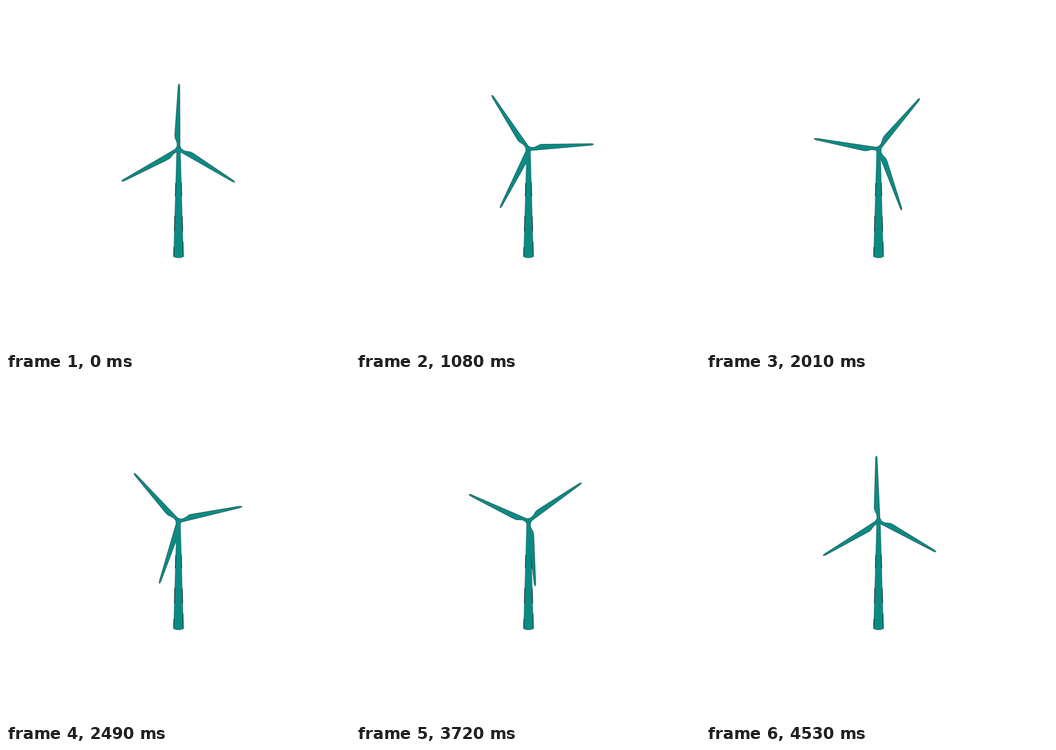
An HTML page for the animation above (4.56 s loop, 748x748 px).

```html
<!DOCTYPE html>
<html lang="en">
<head>
<meta charset="utf-8">
<title>Wind turbine</title>
<style>
  html, body { margin: 0; width: 100%; height: 100%; overflow: hidden; background: #fff; }
  svg { display: block; width: 100%; height: 100%; }
</style>
</head>
<body>
<svg viewBox="0 0 748 748">
  <defs>
    <path id="blade" d="M-3 -5 L-3 -12 C-3.2 -18 -7.8 -22 -7.9 -28 L-7.8 -33 L-0.6 -136 Q0.2 -141.4 1.2 -141.4 Q2.3 -141.2 2.6 -136 L3.2 -5 Z"/>
    <g id="rotor">
      <use href="#blade"/>
      <use href="#blade" transform="rotate(120)"/>
      <use href="#blade" transform="rotate(240)"/>
      <circle r="6"/>
    </g>
    <path id="tower" d="M371.2 314 L370.9 330 L364.7 545 Q375 550 385.4 545 L379.5 330 L379 314 Z"/>
  </defs>
  <!-- outlines lie below every fill, so only the joint silhouette is edged -->
  <g fill="none" stroke="#343c3c" stroke-width="1.5" stroke-linejoin="round">
    <use href="#tower" stroke="#6d7674"/>
    <use class="spin" href="#rotor"/>
  </g>
  <g fill="#0b8a84">
    <use href="#tower"/>
    <path fill="none" stroke="#000" stroke-width="1.1" d="M369 385 L368.1 414 M367 456 L366.1 490 M365.1 524 L364.5 545
      M381.3 384 L382.1 414 M383.3 458 L384.2 490 M384.8 512 L385.7 545"/>
    <use class="spin" href="#rotor"/>
  </g>
</svg>
<script>
  const LOOP = 4560, STEP = 30;
  const rotors = document.querySelectorAll('.spin');

  function draw(ms) {
    const t = Math.floor((ms % LOOP) / STEP) * STEP;
    const pose = `translate(375.1 311.2) rotate(${360 * t / LOOP})`;
    rotors.forEach(r => r.setAttribute('transform', pose));
  }

  let start;
  function tick(now) {
    start ??= now;
    draw(now - start);
    requestAnimationFrame(tick);
  }
  draw(0);
  requestAnimationFrame(tick);
</script>
</body>
</html>
```
